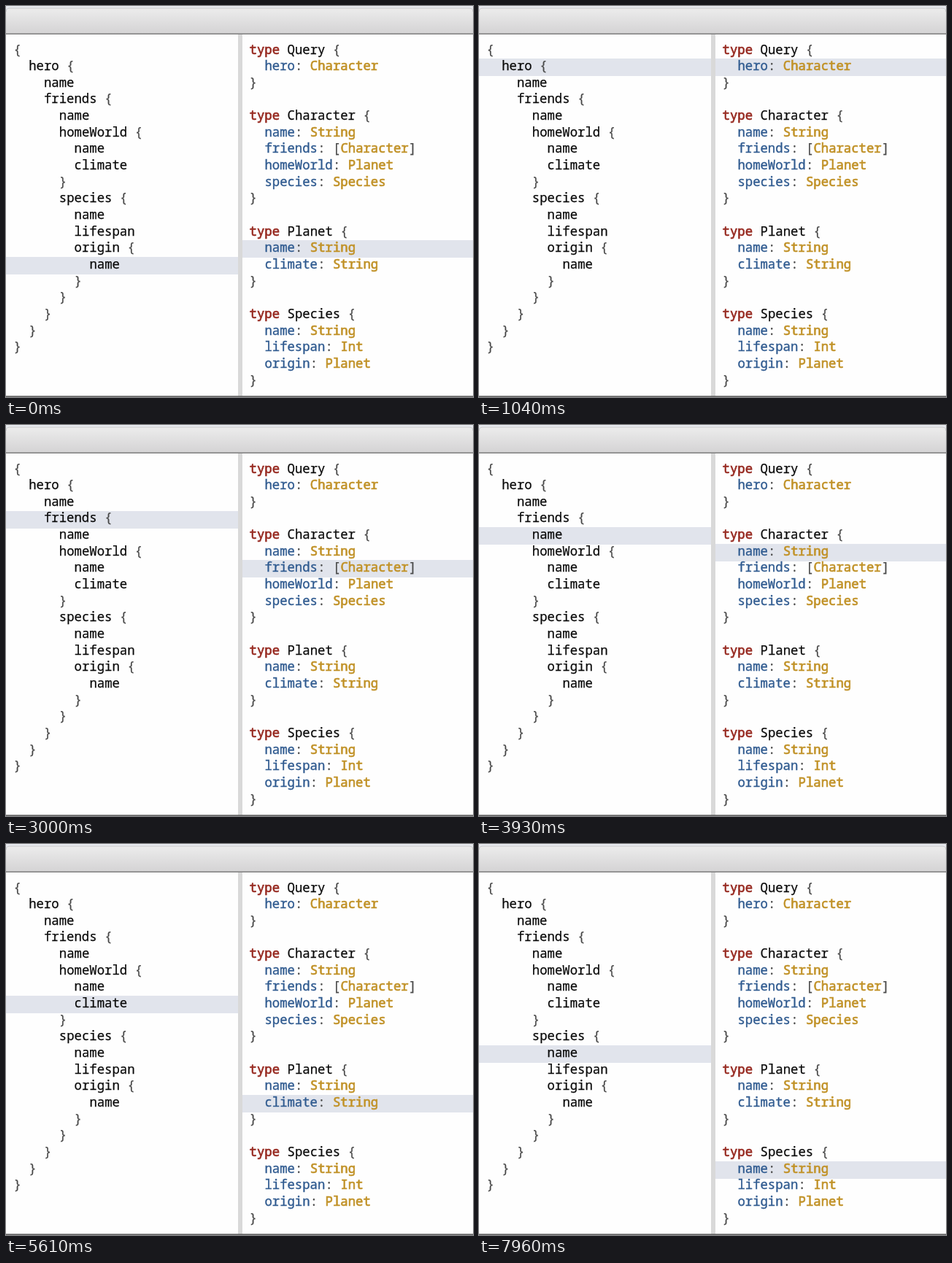
Animation, 640 px wide and 536 px high, one loop 8000 ms. Source, as an HTML page:

```html
<!DOCTYPE html>
<html lang="en">
<head>
<meta charset="utf-8">
<title>Query and schema</title>
<style>
  html, body { margin: 0; width: 100%; height: 100%; overflow: hidden; background: #fefefe; }
  svg { display: block; width: 640px; height: 536px; }
  text { font: 400 17.3px "Roboto Mono", "Noto Sans Mono", monospace; white-space: pre; }
  tspan { fill: var(--ink); stroke: var(--ink); stroke-width: .25px; }
  .name { --ink: #0a0a0a; }
  .punct { --ink: #484848; }
  .keyword { --ink: #982c23; stroke-width: .7px; }
  .field { --ink: #305b90; stroke-width: .4px; }
  .type { --ink: #c19228; stroke-width: .7px; }
  .mark { fill: #e1e4ec; }
</style>
</head>
<body>
<svg viewBox="0 0 640 536">
  <defs>
    <linearGradient id="bar" x2="0" y2="1">
      <stop offset="0" stop-color="#ececec"/>
      <stop offset="1" stop-color="#d4d3d4"/>
    </linearGradient>
  </defs>
  <rect width="640" height="536" fill="#fefefe"/>
  <rect width="640" height="12" fill="#e8eaef"/>
  <path d="M0 38V8Q0 3 5 3H635Q640 3 640 8V38Z" fill="url(#bar)"/>
  <path d="M0 8Q0 3 5 3H635Q640 3 640 8" fill="none" stroke="#c9c9cb"/>
  <rect y="37.5" width="640" height="1.5" fill="#7e7e7e"/>
  <rect x="318" y="39" width="6" height="496" fill="#d9d9d9"/>
  <rect id="leftMark" class="mark" width="318" height="24"/>
  <rect id="rightMark" class="mark" x="324" width="316" height="24"/>
  <g id="code"></g>
  <rect y="534.4" width="640" height="1.6" fill="#626262"/>
</svg>
<script>
const PITCH = 22.65, ADVANCE = 10.4, STEP = 800;

const query = `{
  hero {
    name
    friends {
      name
      homeWorld {
        name
        climate
      }
      species {
        name
        lifespan
        origin {
          name
        }
      }
    }
  }
}`;

const schema = `type Query {
  hero: Character
}

type Character {
  name: String
  friends: [Character]
  homeWorld: Planet
  species: Species
}

type Planet {
  name: String
  climate: String
}

type Species {
  name: String
  lifespan: Int
  origin: Planet
}`;

// Highlighted rows: [query row, schema row]
const steps = [
  [13, 12], [1, 1], [2, 5], [3, 6], [4, 5],
  [5, 7], [6, 12], [7, 13], [9, 8], [10, 17]
];

const code = document.getElementById("code");

function add(parent, tag, attrs, content = "") {
  const node = document.createElementNS("http://www.w3.org/2000/svg", tag);
  for (const key in attrs) node.setAttribute(key, attrs[key]);
  node.textContent = content;
  return parent.appendChild(node);
}

function schemaClass(token, line) {
  if (token === "type") return "keyword";
  if (line.startsWith("type")) return "name";
  return /^[A-Z]/.test(token) ? "type" : "field";
}

function drawCode(source, left, classify) {
  source.split("\n").forEach((line, row) => {
    const text = add(code, "text", { y: 65.5 + row * PITCH });
    for (const { 0: token, index } of line.matchAll(/\w+|[^\w\s]/g)) {
      const kind = /\w/.test(token) ? classify(token, line) : "punct";
      add(text, "tspan", { x: left + index * ADVANCE, class: kind }, token);
    }
  });
}

drawCode(query, 10.4, () => "name");
drawCode(schema, 333.6, schemaClass);

const marks = ["leftMark", "rightMark"].map(id => document.getElementById(id));
const start = performance.now();

function render(now) {
  const time = Math.max(0, now - start) % (STEP * steps.length);
  const rows = steps[Math.floor(time / STEP)];
  marks.forEach((mark, i) => mark.setAttribute("y", Math.ceil(49.1 + rows[i] * PITCH)));
  requestAnimationFrame(render);
}
render(start);
</script>
</body>
</html>
```
